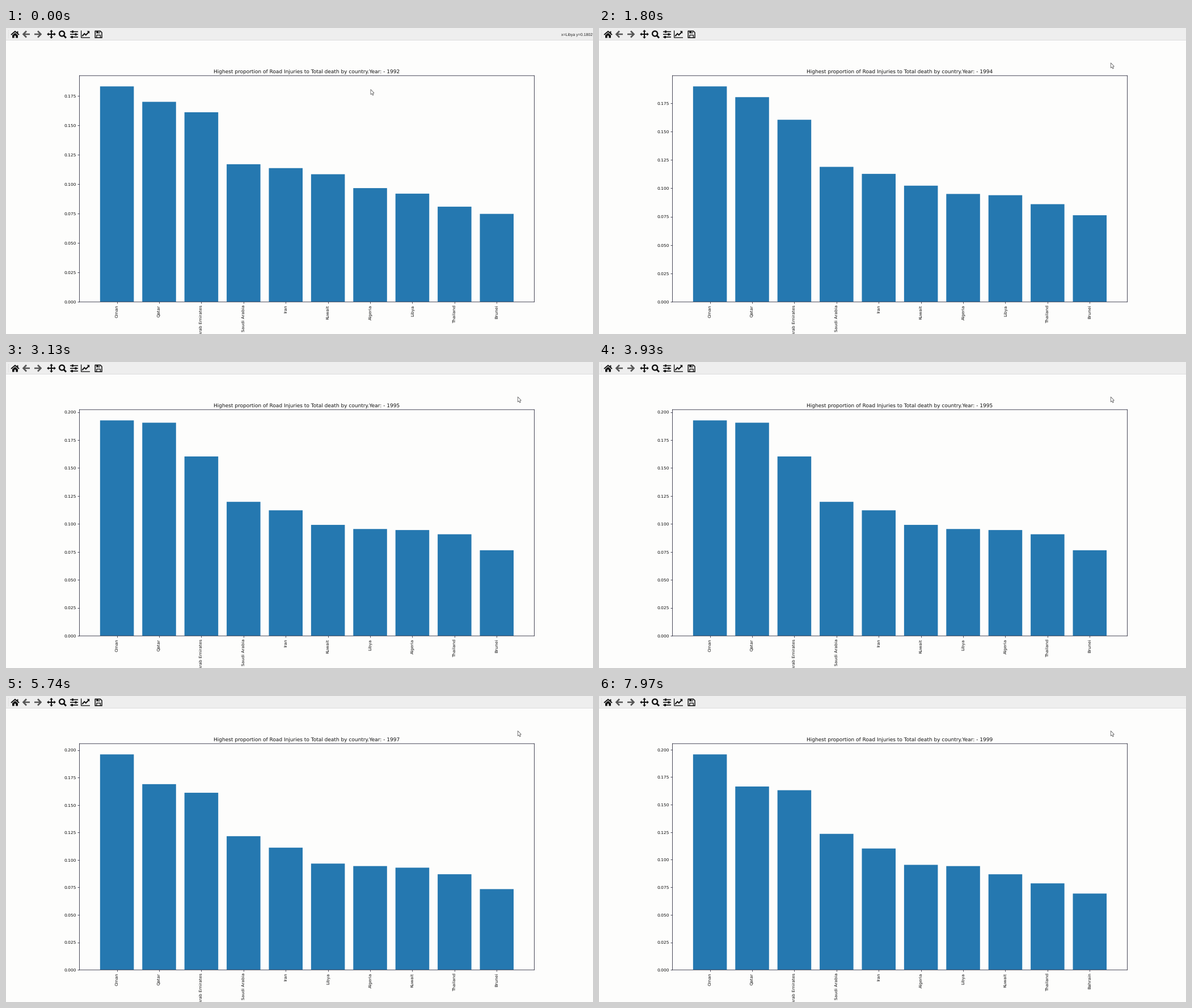
A matplotlib script that plays this animation: 1035x541 px, repeating every 8000 ms.

```python
from math import exp, pi, sin

import matplotlib.pyplot as plt
from matplotlib.animation import FuncAnimation
from matplotlib.patches import Circle, Polygon, Rectangle
from matplotlib.ticker import FormatStrFormatter, MultipleLocator

W, H, DPI = 1035, 541, 100
PX = 72 / DPI                     # points per pixel
FRAMES, STEP = 200, 40
FIRST_CHANGE, YEAR_MS = 700, 1100
MOVE_START, MOVE_END = 1150, 1600
CURSOR_A, CURSOR_B = (643, 108.6), (902.3, 61.6)

BG, BAR, FRAME, INK = "#fdfdfc", "#2578b0", "#1c1c30", "#101010"
LEFT, RIGHT, TOP, BOTTOM = 129.4, 931.5, 84.2, 484.2


def bump(k, centre, width):
    return exp(-((k - centre) / width) ** 2)


# share of deaths in 1/10000, k years after 1992
TRENDS = {
    "Oman": lambda k: 1858 + 106 * sin((k - 0.8) * pi / 10),
    "Qatar": lambda k: 1700 - 5 * k + 220 * bump(k, 3, 1.22),
    "United Arab Emirates": lambda k: 1603 + 1.4 * (k - 2.5) ** 2,
    "Saudi Arabia": lambda k: 1170 + 9.3 * k,
    "Iran": lambda k: 1137 - 5 * k,
    "Kuwait": lambda k: 1085 - 31 * k,
    "Algeria": lambda k: 967 - 11 * k + 1.3 * k ** 2,
    "Libya": lambda k: 920 + 48 * sin(pi * k / 9.2) ** 2,
    "Thailand": lambda k: 805 - 4 * k + 130 * bump(k, 3.7, 2),
    "Brunei": lambda k: 748 + 8 * k - 0.085 * k ** 4,
    "Bahrain": lambda k: 693,
}

plt.rcParams.update({
    "font.family": "DejaVu Sans",
    "text.hinting": "none",
    "toolbar": "None",
})
fig = plt.figure(figsize=(W / DPI, H / DPI), dpi=DPI, facecolor=BG)

# chart
ax = fig.add_axes([LEFT / W, 1 - BOTTOM / H, (RIGHT - LEFT) / W,
                   (BOTTOM - TOP) / H], facecolor=BG)
bars = ax.bar(range(10), [0] * 10, width=0.8, color=BAR, snap=False)
ax.set_xlim(-0.89, 9.89)
ax.set_xticks(range(10))
ax.yaxis.set_major_locator(MultipleLocator(0.025))
ax.yaxis.set_major_formatter(FormatStrFormatter("%.3f"))
ax.tick_params(length=2.7 * PX, pad=2.6 * PX, width=0.8 * PX,
               labelsize=7.48 * PX, color=FRAME, labelcolor=INK)
ax.tick_params(axis="x", labelrotation=90)
for spine in ax.spines.values():
    spine.set(linewidth=0.8 * PX, color=FRAME, snap=False)
title = ax.set_title("", fontsize=8.98 * PX, pad=4.5 * PX, color=INK)

# toolbar and pointer, in pixels from the top left
ui = fig.add_axes([0, 0, 1, 1], zorder=3)
ui.set_xlim(0, W)
ui.set_ylim(H, 0)
ui.axis("off")


def line(points, width, color=INK, **kw):
    xs, ys = zip(*points)
    ui.plot(xs, ys, color=color, lw=width * PX, solid_capstyle="butt",
            solid_joinstyle="miter", snap=False, **kw)


def fill(points, color=INK):
    ui.add_patch(Polygon(points, closed=True, fc=color, ec="none", zorder=3,
                         snap=False))


def box(x, y, w, h, color=INK, z=3):
    ui.add_patch(Rectangle((x, y), w, h, fc=color, ec="none", zorder=z,
                           snap=False))


def home_icon():
    line([(9, 12), (16, 6), (23, 12)], 1.9)
    box(19.4, 5.8, 2, 3.5)
    fill([(11, 12.8), (16, 8.6), (21, 12.8), (21, 17.5), (17.3, 17.5),
          (17.3, 13.6), (14.7, 13.6), (14.7, 17.5), (11, 17.5)])


def arrow_icon(cx, side):
    grey = "#555555"
    tip = cx + 5.4 * side
    line([(cx - 6 * side, 11), (tip - side, 11)], 2.5, grey)
    line([(cx, 5.4), (tip, 11), (cx, 16.6)], 2.7, grey)


def move_icon(cx, cy):
    line([(cx - 6, cy), (cx + 6, cy)], 2)
    line([(cx, cy - 6), (cx, cy + 6)], 2)
    for dx, dy in ((1, 0), (-1, 0), (0, 1), (0, -1)):
        bx, by = cx + 4.6 * dx, cy + 4.6 * dy
        fill([(cx + 7.8 * dx, cy + 7.8 * dy),
              (bx + 3 * dy, by + 3 * dx), (bx - 3 * dy, by - 3 * dx)])


def zoom_icon():
    ui.add_patch(Circle((98.6, 10), 4.5, fc="none", ec=INK, lw=2.4 * PX))
    line([(101.6, 13.1), (106, 17.5)], 2.9)


def sliders_icon():
    for y, knob in ((6.5, 117.5), (11.3, 123), (16, 116.5)):
        line([(113, y), (127, y)], 1.6)
        box(knob - 1.5, y - 2, 3, 4)


def chart_icon():
    line([(132.6, 4.5), (132.6, 17), (148, 17)], 1.3)
    line([(134.3, 14.4), (138.3, 10), (140.8, 12.4), (145.6, 7.4)], 2)
    fill([(142.6, 5.3), (147.2, 5.3), (147.2, 9.9)])


def save_icon():
    line([(157.2, 5.4), (166.4, 5.4), (169, 8), (169, 17.2), (157.2, 17.2),
          (157.2, 4.8)], 1.5)
    box(159.2, 5, 6.4, 4.4)
    box(163, 6, 1.6, 2.4, "#efefef", 4)
    line([(159.8, 17), (159.8, 12.5), (166.4, 12.5), (166.4, 17)], 1.3)


box(0, 0, W, 21, "#eeeeee", 0)
box(0, 21, W, 1, "#dcdcdc", 0)
line([(4.5, 4), (4.5, 18)], 1, "#cccccc", ls=":")
home_icon()
arrow_icon(36, -1)
arrow_icon(56, 1)
move_icon(80, 11)
zoom_icon()
sliders_icon()
chart_icon()
save_icon()
readout = ui.text(979, 13.6, "x=Libya y=0.1802", fontsize=7 * PX,
                  family="Liberation Sans", color="#222222")

POINTER = [(0, 0), (0, 9), (2, 7.3), (3.5, 10.4), (5, 9.7), (3.6, 6.7),
           (6.1, 6.4)]
pointer = Polygon(POINTER, closed=True, fc="white", ec="#5c5c5c",
                  lw=0.8 * PX, zorder=5)
ui.add_patch(pointer)


def show_year(k):
    ranked = sorted(((trend(k) / 10000, name)
                     for name, trend in TRENDS.items()), reverse=True)[:10]
    for bar, (value, _) in zip(bars, ranked):
        bar.set_height(value)
    ax.set_ylim(0, ranked[0][0] * 1.05)
    ax.set_xticklabels([name for _, name in ranked])
    title.set_text("Highest proportion of Road Injuries to Total death "
                   f"by country.Year: - {1992 + k}")


def update(frame):
    t = frame * STEP
    show_year(0 if t < FIRST_CHANGE else 1 + (t - FIRST_CHANGE) // YEAR_MS)
    u = min(max((t - MOVE_START) / (MOVE_END - MOVE_START), 0), 1)
    u = u * u * (3 - 2 * u)
    px, py = (a + (b - a) * u for a, b in zip(CURSOR_A, CURSOR_B))
    pointer.set_xy([(px + dx, py + dy) for dx, dy in POINTER])
    readout.set_visible(py > TOP)
    return []


anim = FuncAnimation(fig, update, frames=FRAMES, interval=STEP, repeat=True,
                     repeat_delay=0, blit=False)
plt.show()
```
